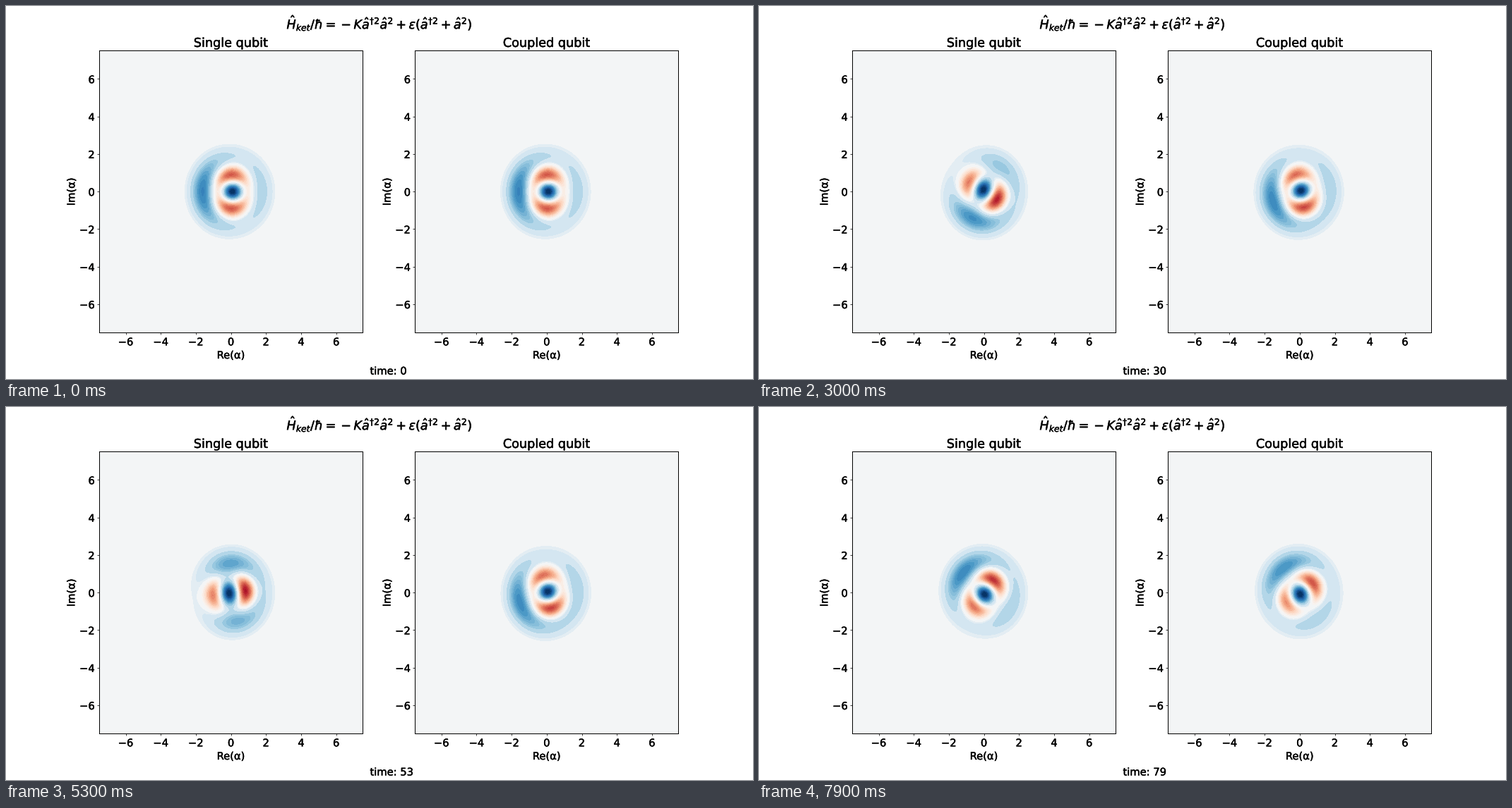
A matplotlib script that plays this animation: 1058 px wide and 529 px high, repeating every 8 s.

```python
import numpy as np
import matplotlib.pyplot as plt
from matplotlib.animation import FuncAnimation
from matplotlib.patheffects import withStroke

FRAMES, INTERVAL = 80, 100
P, B, Q = 0.38, -0.22, 0.89          # amplitudes of the three eigenstates
KAPPA = 0.11                         # drive mixing between |0> and |2>
SINGLE_RATE = np.radians(3.72)       # phase of the top state per step
QUAD_RATE, DIPOLE_RATE = np.radians([313.03, 313.45])
STILL, TURNING = 0.21, 0.79          # coherence shares in the coupled case

plt.rcParams.update({"font.family": "DejaVu Sans", "font.size": 16,
                     "axes.linewidth": 1.1})

# Phase-space grid and the shared radial terms
axis = np.linspace(-3.6, 3.6, 150)
X, Y = np.meshgrid(axis, axis)
A = X + 1j * Y
Z = 2 * np.abs(A) ** 2
GAUSS = np.exp(-Z / 2)

# Colour bands: coarse in the pale blues, fine elsewhere
LEVELS = np.concatenate([[-1.01], np.arange(-19, 0) * 0.05,
                         [0, 0.085, 0.13, 0.24],
                         np.linspace(0.35, 0.95, 13), [1.01]])
MIDS = (LEVELS[:-1] + LEVELS[1:]) / 2
MIDS[np.searchsorted(LEVELS, 0)] = 0.016
COLORS = plt.get_cmap("RdBu")((MIDS + 1) / 2)
PAPER = plt.get_cmap("RdBu")(0.508)


def wigner(k02, k12):
    """Wigner function, scaled to a peak of 1, for two eigenstate coherences."""
    beat = 2 * KAPPA * P * Q * np.real(k02)
    p0 = P**2 + (KAPPA * Q) ** 2 - beat
    p2 = Q**2 + (KAPPA * P) ** 2 + beat
    r02 = P * Q * (k02 - KAPPA**2 * np.conj(k02)) + KAPPA * (P**2 - Q**2)
    r01 = B * (P - KAPPA * Q * k12)
    r12 = B * (Q * k12 + KAPPA * P)

    w = p0 - B**2 * (1 - Z) + p2 * (1 - 2 * Z + Z**2 / 2)
    w = w + 2 * np.sqrt(2) * np.real(np.conj(r01) * A)
    w = w + 2 * np.sqrt(2) * np.real(np.conj(r02) * A**2)
    w = w - 2 * np.real(np.conj(r12) * A) * (2 - Z)
    w = w * GAUSS
    return w / np.abs(w).max()


def single(t):
    k = np.exp(1j * SINGLE_RATE * t)
    return wigner(k, k)


def coupled(t):
    def mix(rate):
        return STILL + TURNING * np.exp(1j * rate * t)
    return wigner(mix(QUAD_RATE), mix(DIPOLE_RATE))


def thicken(*texts):
    for text in texts:
        text.set_path_effects([withStroke(linewidth=0.5, foreground="black")])


fig, axes = plt.subplots(1, 2, figsize=(16, 8), dpi=66.125)
fig.subplots_adjust(left=0.125, right=0.9, bottom=0.125, top=0.88, wspace=0.2)
heading = fig.suptitle(
    r"$\hat{H}_{ket}/\hbar = -K\hat{a}^{\dagger 2}\hat{a}^{2}"
    r" + \varepsilon(\hat{a}^{\dagger 2} + \hat{a}^{2})$")
clock = fig.text(515.5 / 1058, 6.5 / 529, "time: 0")
thicken(heading, clock)

ticks = range(-6, 7, 2)
for ax, title in zip(axes, ("Single qubit", "Coupled qubit")):
    ax.set(xlim=(-7.5, 7.5), ylim=(-7.5, 7.5), xticks=ticks, yticks=ticks,
           title=title, xlabel="Re(α)", ylabel="Im(α)", facecolor=PAPER)
    thicken(ax.title, ax.xaxis.label, ax.yaxis.label,
            *ax.get_xticklabels(), *ax.get_yticklabels())

fills = []


def update(t):
    while fills:
        fills.pop().remove()
    for ax, state in zip(axes, (single, coupled)):
        fills.append(ax.contourf(X, Y, state(t), levels=LEVELS, colors=COLORS))
    clock.set_text(f"time: {t}")
    return fills


anim = FuncAnimation(fig, update, frames=FRAMES, interval=INTERVAL,
                     init_func=lambda: update(0), repeat=True,
                     repeat_delay=0, blit=False)
plt.show()
```
